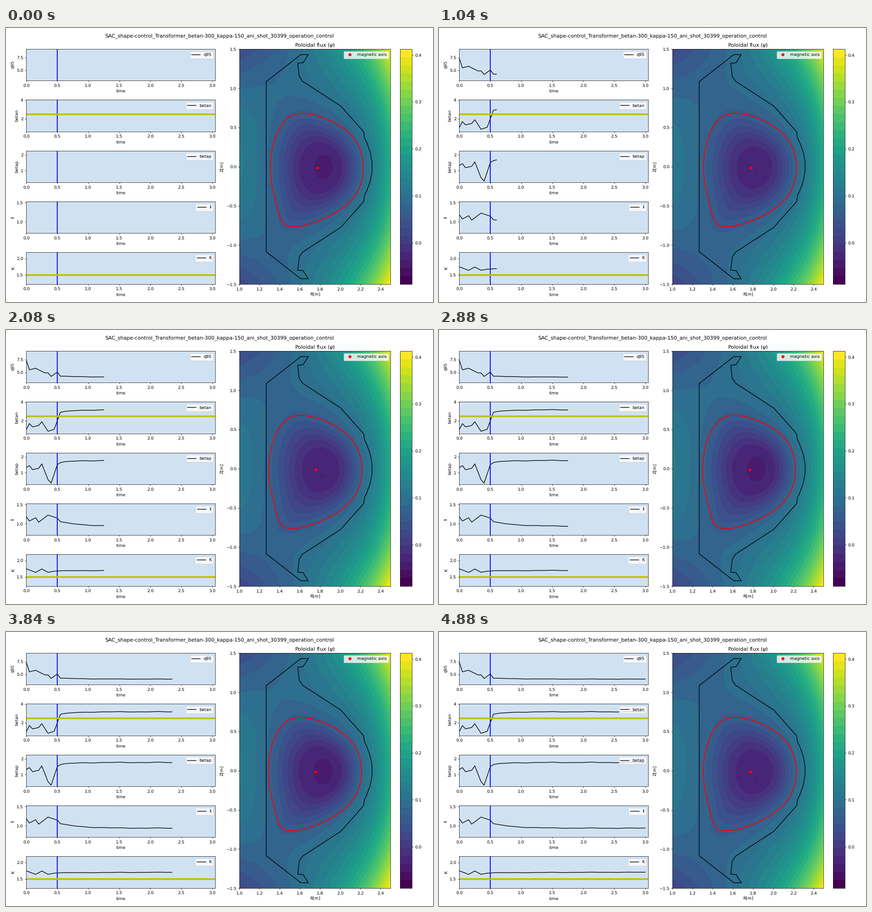
Recreate the animation shown at these times as a matplotlib script. Size 933 px wide and 600 px high, loop 4.96 s.

```python
import numpy as np
import matplotlib.pyplot as plt
from matplotlib.animation import FuncAnimation
from matplotlib.cm import ScalarMappable
from matplotlib.colors import BoundaryNorm

W, H = 933, 600
FRAMES, INTERVAL = 62, 80
DT = 0.05

plt.rcParams["font.family"] = "DejaVu Sans"
plt.rcParams["text.hinting"] = "none"
fig = plt.figure(figsize=(13.995, 9), dpi=66.667, facecolor="white")
fig.suptitle("SAC_shape-control_Transformer_betan-300_kappa-150"
             "_ani_shot_30399_operation_control")


def axes_at(left, top, right, bottom):
    return fig.add_axes([left / W, 1 - bottom / H,
                         (right - left) / W, (bottom - top) / H])


# ---- time traces ----
TIMES = DT * np.arange(FRAMES)
CONTROL_STEP = 11


def trace(start, end, tau, ripple):
    """Key points (step, value) up to control, then a rippled relaxation."""
    steps, values = zip(*start)
    early = np.interp(np.arange(FRAMES), steps, values)
    t = TIMES - CONTROL_STEP * DT
    wave = 0.6 * np.sin(9 * t) + 0.4 * np.sin(21 * t)
    late = end + (values[-1] - end) * np.exp(-t / tau) + ripple * wave
    return np.where(t < 0, early, late)


Q95 = trace([(0, 7.35), (1, 5.5), (3, 5.8), (6, 4.9), (7, 4.9), (8, 4.2),
             (10, 5.07), (11, 4.25)], 4.07, 0.45, 0.03)
BETAN = trace([(0, 1.07), (1, 1.7), (2, 1.35), (4, 1.5), (5, 1.9), (7, 0.88),
               (9, 1.1), (11, 2.9)], 3.17, 0.22, 0.025)
BETAP = trace([(0, 1.32), (1, 1.44), (2, 1.18), (4, 1.27), (5, 1.55),
               (7, 0.55), (8, 0.33), (10, 1.5), (11, 1.63)], 1.765, 0.2, 0.02)
LI = trace([(0, 1.18), (1, 1.07), (3, 1.155), (4, 1.04), (7, 1.225),
            (10, 1.145), (11, 1.052)], 0.935, 0.32, 0.007)
K = trace([(0, 1.745), (3, 1.637), (5, 1.74), (7, 1.64), (9, 1.673),
           (11, 1.685)], 1.705, 1.2, 0.005)

PANELS = [
    ("q95", Q95, (2.98, 9.19), ("5.0", "7.5"), None),
    ("betan", BETAN, (0.64, 4.02), ("2", "4"), 2.5),
    ("betap", BETAP, (0.25, 2.26), ("1", "2"), None),
    ("li", LI, (0.698, 1.527), ("1.0", "1.5"), None),
    ("K", K, (1.22, 2.185), ("1.5", "2.0"), 1.5),
]


def build_panel(row, name, values, ylim, ticks, goal):
    top = 45.9 + 111.35 * row
    ax = axes_at(44.4, top, 457.4, top + 69.5)
    ax.set_facecolor(plt.cm.Blues(0.2))
    line, = ax.plot([], [], "k", lw=1.5, label=name)
    ax.axvline(0.5, color="b", lw=2)
    if goal is not None:
        ax.axhline(goal, color="y", lw=4)
    ax.set(xlim=(0, 3.05), ylim=ylim, xlabel="time", ylabel=name)
    ax.set_xticks(np.arange(0, 3.1, 0.5))
    ax.set_yticks([float(v) for v in ticks], ticks)
    ax.legend(loc="upper right")
    return line, values


traces = [build_panel(i, *panel) for i, panel in enumerate(PANELS)]

# ---- flux map ----
LEVELS = np.linspace(-0.0885, 0.4126, 30)
NORM = BoundaryNorm(LEVELS, 256)
R, Z = np.meshgrid(np.linspace(1, 2.5, 65), np.linspace(-1.5, 1.5, 65))
CORE_R, CORE_Z = 1.805, -0.015

# Plasma state at key frames: (frame, radial shift, flux depth)
STATE = np.array([(0, 0, 1), (13, 0.002, 0), (19, 0.019, 0),
                  (26, -0.015, 0.25), (36, -0.007, 1), (48, -0.019, 1.05),
                  (61, 0, 0.2)]).T


def wall_outline():
    corners = [(1.265, 1.085), (1.608, 1.429), (1.683, 1.431), (1.631, 1.326),
               (1.578, 1.32), (1.593, 1.153), (1.626, 1.09), (2.006, 0.773),
               (2.233, 0.444)]
    bow = [(2.3175 - 0.57 * z * z, z) for z in (0.369, 0.31, 0.189, 0.062)]
    half = np.array(corners + bow)
    return np.vstack([half, half[::-1] * [1, -1], half[:1]])


def plasma_edge():
    """D-shaped boundary with a sharper lower corner."""
    a = np.linspace(-np.pi, np.pi, 241)
    upper = np.sin(a) > 0
    lean = np.where(upper, 0.275, 0.435)
    corner = np.where(upper, 0.045, 0.1) + 0.02 * np.sin(2 * a)
    bent = a + lean * np.sin(a) - corner * np.sin(3 * a)
    height = np.where(upper, 0.697, 0.762)
    return np.column_stack([1.768 + 0.462 * np.cos(bent),
                            -0.01 + height * np.sin(a)])


EDGE = plasma_edge()


def vacuum_flux(depth):
    u = R - 1
    middle = 0.117 - 0.047 * u + 0.0152 * u ** 6
    top = 0.022 + 0.112 * u + 0.0415 * u ** 4
    tilt = -0.005 * Z * (u - 0.6)
    return (middle + (top - middle) * Z ** 2 / 2.25 + tilt
            + depth * (0.012 - 0.003 * Z ** 2))


def plasma_radius(edge):
    """Normalised radius: elliptic in the core, edge-shaped near 1."""
    x, z = R - CORE_R, Z - CORE_Z
    ex, ez = edge[:-1, 0] - CORE_R, edge[:-1, 1] - CORE_Z
    reach = np.interp(np.arctan2(z, x), np.arctan2(ez, ex),
                      np.hypot(ex, ez), period=2 * np.pi)
    shaped = np.hypot(x, z) / reach
    core = np.hypot(x / 0.465, z / 0.66)
    mix = 2 * shaped ** 2 / (1 + shaped ** 4)
    return core + (shaped - core) * mix


def flux(edge, depth):
    s = plasma_radius(edge)
    well = (0.113 + 0.0205 * depth) / (1 + (s / (0.78 + 0.03 * depth)) ** 4)
    psi = vacuum_flux(depth) - well
    psi[30, 35] -= 0.018
    return psi


ax = axes_at(510.2, 46.2, 840.4, 561.2)
ax.set(xlim=(1, 2.5), ylim=(-1.5, 1.5), xlabel="R[m]", ylabel="Z[m]")
ax.set_title(r"Poloidal flux ($\psi$)")
ax.set_xticks(np.arange(1, 2.5, 0.2))
ax.set_yticks(np.arange(-1.5, 1.6, 0.5))

ax.plot(*wall_outline().T, "k", lw=1.5)
edge_line, = ax.plot([], [], "r", lw=2)
axis_dot, = ax.plot([], [], "ro", ms=6, label="magnetic axis")
ax.legend(loc="upper right")

bar = fig.colorbar(ScalarMappable(NORM, "viridis"),
                   cax=axes_at(861.2, 46.2, 887, 561.2),
                   ticks=np.arange(5) / 10, format="%.1f")
bar.minorticks_off()

layers = []


def update(frame):
    for line, values in traces:
        line.set_data(TIMES[:frame], values[:frame])

    shift, depth = (np.interp(frame, STATE[0], row) for row in STATE[1:])
    edge = EDGE * [1, 0.992] + [shift, 0]
    edge_line.set_data(*edge.T)
    axis_dot.set_data([1.772 + shift], [-0.012])

    while layers:
        layers.pop().remove()
    layers.append(ax.contourf(R, Z, flux(edge, depth), levels=LEVELS,
                              cmap="viridis", norm=NORM, zorder=0))


anim = FuncAnimation(fig, update, frames=FRAMES, interval=INTERVAL,
                     repeat=True, blit=False)
plt.show()
```
